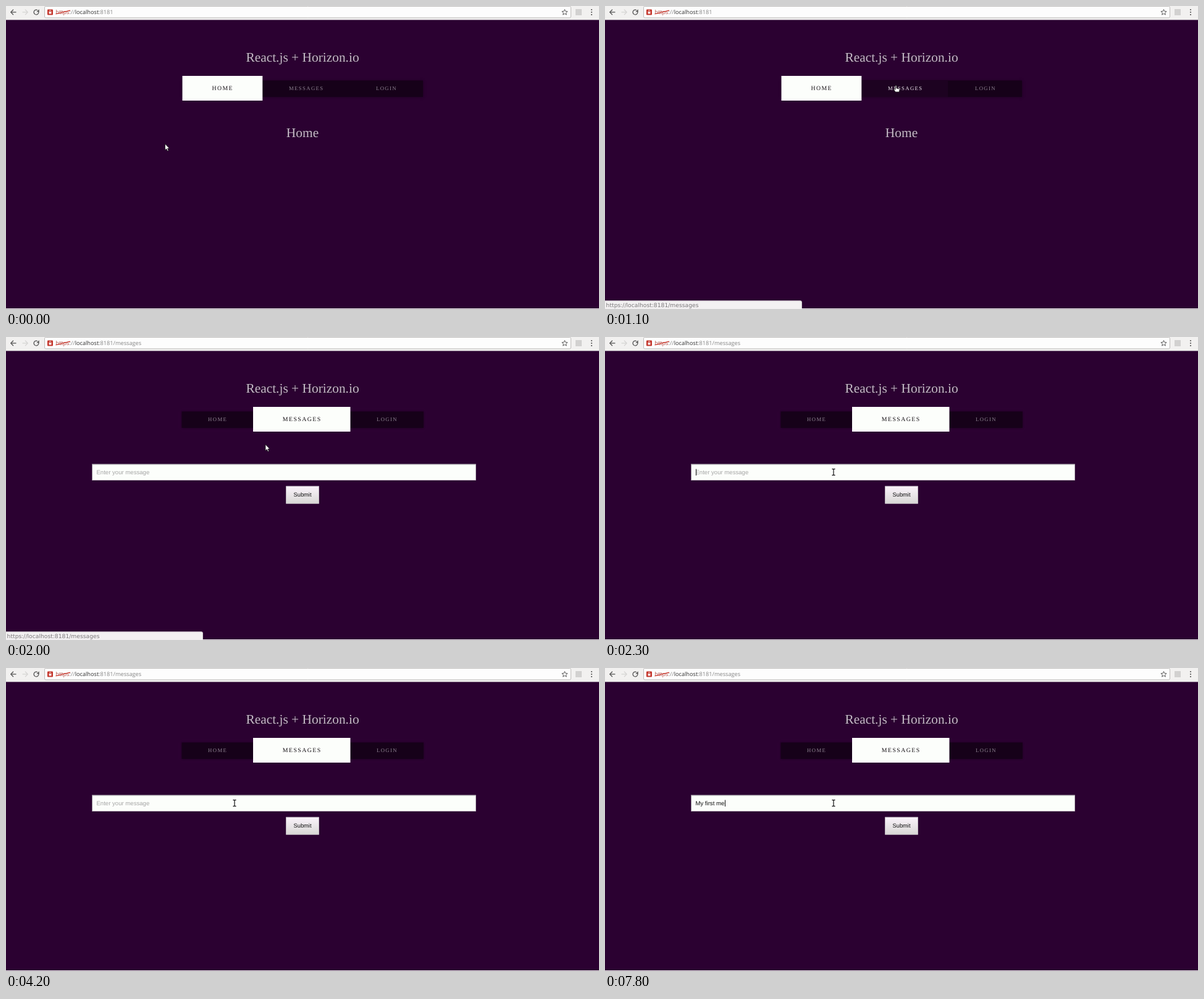
Recreate the animation shown at these times as an HTML page with a canvas. Size 960x490 px, loop 8000 ms.

```html
<!DOCTYPE html>
<html lang="en">
<head>
<meta charset="utf-8">
<title>Messages demo</title>
<style>
html, body { margin: 0; width: 100%; height: 100%; overflow: hidden; background: #2b0131; }
canvas { display: block; }
</style>
</head>
<body>
<canvas id="stage" width="960" height="490"></canvas>
<script>
const ctx = document.getElementById('stage').getContext('2d');
const LOOP = 8000, STEP = 100;
const SERIF = '"Liberation Serif", serif';
const SANS = '"Liberation Sans", sans-serif';
const UI = '"Open Sans", sans-serif';
const STATUS = '"DejaVu Sans", sans-serif';
ctx.textRendering = 'geometricPrecision';

const HOVER = 1000, OPEN = 1400, LEAVE = 1900, FOCUS = 2200;
const TYPED = [
  [4500, 'M'], [5000, 'My'], [5500, 'My '], [6000, 'My f'], [6500, 'My fir'],
  [6800, 'My firs'], [7300, 'My first'], [7400, 'My first '],
  [7600, 'My first m'], [7800, 'My first me']
];
// Pointer stops: time, x, y
const PATH = [[0, 258, 223], [100, 258, 223], [1050, 471, 129], [1800, 471, 129], [2200, 370, 218.5]];

function rect(x, y, w, h, fill) {
  ctx.fillStyle = fill;
  ctx.fillRect(x, y, w, h);
}

function box(x, y, w, h, r, fill, stroke) {
  ctx.beginPath();
  ctx.roundRect(x, y, w, h, r);
  ctx.fillStyle = fill;
  ctx.fill();
  if (stroke) {
    ctx.strokeStyle = stroke;
    ctx.lineWidth = 1;
    ctx.stroke();
  }
}

function line(color, width, ...pts) {
  ctx.beginPath();
  for (let i = 0; i < pts.length; i += 2) ctx.lineTo(pts[i], pts[i + 1]);
  ctx.strokeStyle = color;
  ctx.lineWidth = width;
  ctx.stroke();
}

function shape(d, x, y, fill, stroke, width = 1) {
  const path = new Path2D(d);
  ctx.save();
  ctx.translate(x, y);
  ctx.lineJoin = 'round';
  if (fill) { ctx.fillStyle = fill; ctx.fill(path); }
  if (stroke) { ctx.strokeStyle = stroke; ctx.lineWidth = width; ctx.stroke(path); }
  ctx.restore();
}

// Draws text and returns the x where it ends.
function text(str, x, y, size, family, color, align = 'left', spacing = 0) {
  ctx.font = `${size}px ${family}`;
  ctx.letterSpacing = spacing + 'px';
  ctx.fillStyle = color;
  const w = ctx.measureText(str).width;
  ctx.textAlign = 'left';
  ctx.fillText(str, align === 'center' ? x - (w - spacing) / 2 : x, y);
  ctx.letterSpacing = '0px';
  return x + w;
}

function star(x, y, r) {
  ctx.beginPath();
  for (let i = 0; i < 10; i++) {
    const a = i * Math.PI / 5 - Math.PI / 2, q = i % 2 ? r * 0.45 : r;
    ctx.lineTo(x + q * Math.cos(a), y + q * Math.sin(a));
  }
  ctx.closePath();
  ctx.strokeStyle = '#5a5a5a';
  ctx.lineWidth = 1;
  ctx.stroke();
}

function backArrow(x, dir, color) {
  line(color, 1.3, x + 4.5 * dir, 10, x - 4 * dir, 10);
  line(color, 1.3, x, 5.8, x - 4.2 * dir, 10, x, 14.2);
}

function toolbar(t) {
  rect(0, 0, 960, 22, '#f2f1f0');
  rect(0, 22, 960, 1, '#8d7b90');
  backArrow(12, 1, '#555');
  backArrow(31, -1, '#d6d5d4');

  ctx.beginPath();
  ctx.arc(49, 10, 3.9, -0.5, 5.2);
  ctx.strokeStyle = '#555';
  ctx.lineWidth = 1.3;
  ctx.stroke();
  shape('M4.6 -4.8V-.6H.4Z', 49, 10, '#555');

  box(62.5, 0.5, 852, 18.5, 2, '#fdfdfd', '#bdbbb9');
  box(67, 5.5, 9, 9, 1, '#c3342a');
  rect(69.5, 9.5, 4, 3, '#fff');
  shape('M-1.3 0V-1.2A1.3 1.3 0 0 1 1.3 -1.2V0', 71.5, 9.6, null, '#fff', 0.8);

  let x = text('https', 80.3, 13.2, 9.2, UI, '#b5524c');
  line('#cb3b30', 1.2, 80.5, 12.8, 104, 7.2);
  x = text('://', x, 13.2, 9.2, UI, '#8a8a8a');
  x = text('localhost', x, 13.2, 9.2, UI, '#333');
  text(':8181' + (t >= OPEN ? '/messages' : ''), x, 13.2, 9.2, UI, '#858585');

  star(904.5, 10.3, 4.8);
  rect(922, 5, 10, 10, '#d2d1d0');
  for (const y of [6, 10, 14]) {
    ctx.beginPath();
    ctx.arc(948, y, 1.1, 0, 7);
    ctx.fillStyle = '#555';
    ctx.fill();
  }
}

function tab(label, x, active, hot) {
  if (active) text(label, x, 136.3, 9.8, SERIF, '#151015', 'center', 1.45);
  else text(label, x, 136.2, 8.7, SERIF, hot ? '#f0ebf0' : '#8f8492', 'center', 1.4);
}

function nav(t) {
  const open = t >= OPEN;
  ctx.save();
  ctx.shadowColor = 'rgba(15,0,18,.6)';
  ctx.shadowBlur = 4;
  if (open) rect(284.5, 120.5, 391.5, 26.5, '#160119');
  else rect(285.5, 120.5, 389.5, 26.5, '#160119');
  ctx.restore();
  if (!open && t >= HOVER) rect(415, 120.5, 140, 26.5, '#1d0221');

  if (open) rect(400, 113, 157.5, 40, '#fcfefb');
  else rect(285.5, 113, 129.8, 40, '#fcfefb');

  tab('HOME', open ? 342 : 350, !open);
  tab('MESSAGES', open ? 478.5 : 485.5, open, t >= HOVER);
  tab('LOGIN', open ? 616.3 : 615.3, false);
}

function caretOn(t) {
  if (t < FOCUS) return false;
  if (t >= TYPED[0][0]) return true;
  return t < 2800 || (t >= 3500 && t < 4200);
}

function form(t) {
  box(139.5, 205.8, 621, 25.7, 0, '#fcfefb', '#b9b3ba');
  line('#8f8892', 1, 139.5, 231.5, 139.5, 205.8, 760.5, 205.8);
  let value = '';
  for (const [at, str] of TYPED) if (t >= at) value = str;
  const x = 146.4;
  if (value) text(value, x, 222.2, 9.6, SANS, '#111');
  else text('Enter your message', x, 222.2, 9.6, SANS, '#a5a5a5');
  if (caretOn(t)) {
    ctx.font = `9.6px ${SANS}`;
    const w = ctx.measureText(value).width;
    rect(Math.round(x + w + 0.2), 213.5, 1, 10.5, '#111');
  }

  const g = ctx.createLinearGradient(0, 241, 0, 269);
  g.addColorStop(0, '#fbf3fb');
  g.addColorStop(1, '#d9d8d6');
  box(453.5, 241.3, 53, 28, 0, g, '#bcb4bd');
  text('Submit', 480, 258.4, 9.3, SANS, '#111', 'center');
}

function status(t) {
  if (t < HOVER || t >= LEAVE + 200) return;
  box(-2, 476.8, 320.5, 16, 2, '#f3f1f2', '#c9c5c9');
  text('https://localhost:8181/messages', 1.6, 487, 9.2, STATUS, '#7b797b');
}

function pointerAt(t) {
  let i = 0;
  while (i < PATH.length - 2 && t >= PATH[i + 1][0]) i++;
  const [t0, x0, y0] = PATH[i], [t1, x1, y1] = PATH[i + 1];
  const k = Math.min(1, (t - t0) / (t1 - t0)), e = k * k * (3 - 2 * k);
  return [x0 + (x1 - x0) * e, y0 + (y1 - y0) * e];
}

function pointer(t) {
  const [x, y] = pointerAt(t);
  if (t >= OPEN && t < 1700) {
    ctx.beginPath();
    ctx.arc(470.5, 130.3, 8, 0, 7);
    ctx.strokeStyle = 'rgba(226,130,135,.65)';
    ctx.lineWidth = 1.6;
    ctx.stroke();
  }
  if (y > 206 && t >= OPEN) {
    const ibeam = 'M-2.5 -5H-.8L0 -4.4L.8 -5H2.5M0 -4.4V4.4M-2.5 5H-.8L0 4.4L.8 5H2.5';
    shape(ibeam, x, y, null, '#fff', 2.4);
    shape(ibeam, x, y, null, '#222', 1.3);
  } else if (t >= HOVER && y < 153) {
    shape('M-1 0Q0 -1 1 0V4L5 4.8Q6 5.2 6 6.5L5.2 10H-.8L-3.4 6.2Q-3.4 4.8 -2.2 5.2L-1 6.3Z',
      x, y, '#fff', '#222', 0.9);
  } else {
    shape('M0 0V10L2.3 7.9L4 11.5L5.6 10.7L4 7.3H7Z', x - 0.5, y, '#fff', '#1a1a1a', 0.8);
  }
}

function draw(t) {
  rect(0, 0, 960, 490, '#2b0131');
  toolbar(t);
  text('React.js + Horizon.io', 480, 90, 21.4, SERIF, '#c3bbc4', 'center');
  nav(t);
  if (t < OPEN) text('Home', 480, 211.8, 21.4, SERIF, '#c3bbc4', 'center');
  else form(t);
  status(t);
  rect(0, 489, 960, 1, '#efedef');
  pointer(t);
}

const start = performance.now();
function tick() {
  const t = (performance.now() - start) % LOOP;
  draw(Math.floor(t / STEP) * STEP);
  requestAnimationFrame(tick);
}
tick();
</script>
</body>
</html>
```
